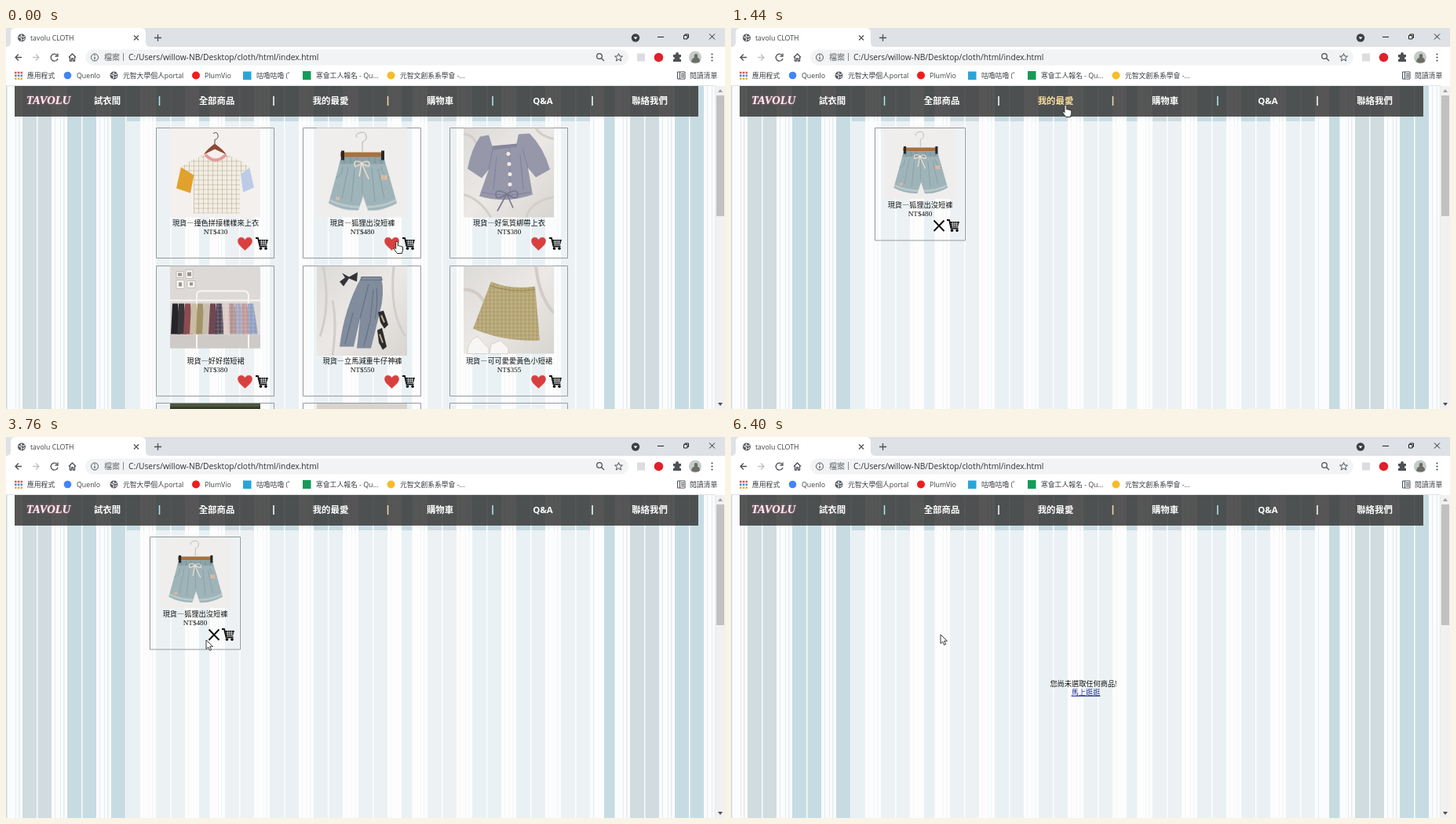
An HTML page that plays this animation: 916 by 486 pixels, repeating every 6.48 s.

```html
<!DOCTYPE html>
<html lang="zh-Hant">
<head>
<meta charset="utf-8">
<title>tavolu CLOTH</title>
<style>
html, body { margin: 0; width: 100%; height: 100%; overflow: hidden; background: #fff; }
svg { display: block; }
text { font-family: "Open Sans", "Noto Sans CJK TC", "Noto Sans CJK", sans-serif; fill: #3c4043; white-space: pre; }
.ui text { font-size: 8.8px; }
.ui .url { font-size: 10.25px; fill: #333; }
.line { fill: none; stroke: #4d5156; stroke-width: 1.3; }
.nav text { font-size: 11.4px; font-weight: 700; fill: #fff; text-anchor: middle; }
.nav .logo { font: italic 700 14.5px "Liberation Serif", serif; text-anchor: start; text-shadow: 0 0 2px #e8a; fill: #fdeef4; }
.item text { font-size: 9.2px; font-family: "Noto Sans CJK TC", "Noto Sans CJK", sans-serif; fill: #111; text-anchor: middle; }
.item .price { font-family: "Liberation Serif", serif; }
.box { fill: none; stroke: #959a9f; }
.empty text { font-size: 9.2px; fill: #111; text-anchor: middle; }
.empty .link { fill: #1c2f8c; text-decoration: underline; }

.shop, .faves, .saved, .empty, .hand, .arrow, .like, .all { animation: 6480ms step-end infinite; }
.shop { animation-name: shop; }
.faves { animation-name: faves; }
.saved { animation-name: saved; }
.empty { animation-name: empty; }
.hand { animation-name: hand; }
.arrow { animation-name: arrow; }
.nav .like { animation-name: like; }
.nav .all { animation-name: all; }
.zoom { transform-origin: 57.5px 57.5px; animation: zoom 6480ms infinite; }
.pointer { animation: move 6480ms linear infinite; }

@keyframes shop { 0% { opacity: 1 } 20.98%, 100% { opacity: 0 } }
@keyframes faves { 0% { opacity: 0 } 20.98%, 100% { opacity: 1 } }
@keyframes saved { 0% { opacity: 1 } 93.82%, 100% { opacity: 0 } }
@keyframes empty { 0% { opacity: 0 } 93.82%, 100% { opacity: 1 } }
@keyframes hand { 0% { opacity: 1 } 2.8% { opacity: 0 } 15.4% { opacity: 1 } 24% { opacity: 0 } 28.8% { opacity: 1 } 36.2%, 100% { opacity: 0 } }
@keyframes arrow { 0% { opacity: 0 } 2.8% { opacity: 1 } 15.4% { opacity: 0 } 24% { opacity: 1 } 28.8% { opacity: 0 } 36.2%, 100% { opacity: 1 } }
@keyframes like { 0% { fill: #fff } 15.4% { fill: #f8dc9c } 24%, 100% { fill: #fff } }
@keyframes all { 0% { fill: #fff } 28.8% { fill: #f8dc9c } 36.2%, 100% { fill: #fff } }
@keyframes zoom { 0%, 4.1% { transform: scale(1) } 8.5%, 13.3% { transform: scale(1.1) } 16.5%, 100% { transform: scale(1) } }
@keyframes move {
  0%, 1.2% { transform: translate(498px, 272px) }
  2.5% { transform: translate(497px, 269px) }
  8.64% { transform: translate(416px, 159px) }
  11.1% { transform: translate(416px, 150px) }
  16.05% { transform: translate(427px, 99px) }
  17.28%, 22.2% { transform: translate(427px, 98px) }
  29.6% { transform: translate(274px, 97px) }
  33.33%, 35.8% { transform: translate(272px, 96px) }
  45.68%, 67.9% { transform: translate(255px, 259px) }
  71.6%, 100% { transform: translate(267px, 252px) }
}
</style>
</head>
<body>
<svg width="916" height="486" viewBox="0 0 916 486">
<defs>
  <g id="pair">
    <path d="M0 0h18v500h-18zM19.5 0h17.5v500h-17.5z"/>
    <path d="M-9 0h1v500h-1zM-5 0h1.500v500h-1.500zM41 0h1v500h-1z" fill="#e3ecef"/>
  </g>
  <pattern id="stripes" x="-12" width="258" height="500" patternUnits="userSpaceOnUse" fill="#c7dce2">
    <path d="M0 0h258v500h-258z" fill="#fbfcfd"/>
    <path d="M0 0h13.500v500h-13.500z"/>
    <use href="#pair" x="33" fill="#d0dce0"/>
    <use href="#pair" x="90"/>
    <use href="#pair" x="146"/>
    <use href="#pair" x="203" fill="#cddee4"/>
  </pattern>
  <pattern id="grid" width="6" height="6" patternUnits="userSpaceOnUse"><path d="M0 .5H6M.5 0V6" stroke="#aaa492" stroke-width=".5"/></pattern>
  <pattern id="plaid" width="5" height="5" patternUnits="userSpaceOnUse"><path d="M0 1H5M1 0V5" stroke="#fff" stroke-opacity=".22"/></pattern>
  <linearGradient id="sheet" x2="1" y2="1"><stop stop-color="#dddbd8"/><stop offset=".5" stop-color="#ebe8e5"/><stop offset="1" stop-color="#d8d5d1"/></linearGradient>
  <clipPath id="frame"><path d="M0 0h115v114.500H0z"/></clipPath>

  <path id="heart" d="M0 8C-4 4-9 1-9-4C-9-9-2.500-10 0-5C2.500-10 9-9 9-4C9 1 4 4 0 8z" fill="#d8403f" stroke="#d8403f" stroke-width=".6"/>
  <g id="cart">
    <path d="M0 1h3l2.500 10.500h9" fill="none" stroke="#111" stroke-width="1.800"/>
    <path d="M3.500 3H16l-2 6.500H5z" fill="#111"/>
    <path d="M5 5.200h9.500M5.500 7.400h8.500M7.500 3.500v5.500M10 3.500v5.500M12.500 3.500v5.500" stroke="#eef3f5" stroke-width=".7"/>
    <circle cx="6.500" cy="14.300" r="1.700"/><circle cx="13" cy="14.300" r="1.700"/>
  </g>
  <g id="globe">
    <circle r="5" fill="#565a5f"/>
    <path d="M-4-1l3 1 1 2-1 2M0-4l-1 2 3 1 2-1M4 1l-2 1v1" fill="none" stroke="#fff" stroke-width="1.100"/>
  </g>

  <g id="tee">
    <path d="M0 0h115v114H0z" fill="#f4f0ed"/>
    <path d="M57 22V15q5-1 4-6t-6-2" fill="none" stroke="#555"/>
    <path d="M43 34q3-6 14-14 11 8 15 14l-15-7z" fill="#8d4a32"/>
    <path d="M14 50l18 2-6 31-18-6z" fill="#e0a22c"/>
    <path d="M89 52l12-2 6 26-14 6z" fill="#bccbe6"/>
    <path d="M44 34q13 10 28 0l20 9 9 8-12 9v49H30V60l-16-10 14-9z" fill="#f3eee2"/>
    <path d="M44 34q13 10 28 0l20 9 9 8-12 9v49H30V60l-16-10 14-9z" fill="url(#grid)"/>
    <path d="M45 34q13 14 26 0" fill="none" stroke="#e79a9c" stroke-width="4"/>
  </g>
  <g id="shorts">
    <path d="M0 0h115v114H0z" fill="#efeeec"/>
    <path d="M58 30V18q6-2 5-8t-8-4-4 6" fill="none" stroke="#aaa" stroke-width=".9"/>
    <path d="M30 31h55v6H30z" fill="#a8703f"/>
    <path d="M31 37h54l6 20 11 39q-20 11-37 9l-6-18-6 18q-20 1-38-9l11-40z" fill="#9fb4b9"/>
    <path d="M31 37h54l2 9H29z" fill="#8ba4aa"/>
    <path d="M16 92q18 9 38 9M64 101q20 0 37-9" fill="none" stroke="#bccbcd" stroke-width="3"/>
    <path d="M58 46v38M33 50q0 10-9 14M82 50q1 10 10 13M40 50l-8 40M48 52l-4 42M70 52l4 42M78 52l8 38" fill="none" stroke="#839da4"/>
    <path d="M35 38v7M43 38v7M51 38v7M66 38v7M74 38v7M82 38v7" stroke="#748f96"/>
    <path d="M57 44q-9-4-9 2t9-1q9-5 10 1t-10-1l-3 17m3-17l9 20" fill="none" stroke="#f0dfd0" stroke-width="1.500"/>
    <path d="M31 29h4v12h-4zM82 29h4v12h-4z" fill="#292929"/>
    <path d="M82 60h8v6h-8zM24 88h5v4h-5z" fill="#dbb9a0"/>
  </g>
  <g id="blouse">
    <path d="M0 0h115v114H0z" fill="url(#sheet)"/>
    <path d="M0 85q20 5 35 29M80 114q5-20 35-26M92 0q5 10 23 14M0 8q15 0 18 20" fill="none" stroke="#d3cec9" stroke-width="3"/>
    <path d="M21 11l11-2 5 16 30-3 3-14 14-1q18 18 26 46l-18 10-10-12 6 34q-34 12-68 2l12-34-9 11L5 52q5-26 16-41z" fill="#9797aa"/>
    <path d="M36 23l32-3v4l-31 4z" fill="#85859b"/>
    <path d="M23 82q32 7 62 0M59 25v60M32 53l5-25M82 51l-7-25M42 36l-4 42M72 34l4 44" fill="none" stroke="#80809a"/>
    <path d="M55 84q-14-8-14 1t14-1q14-8 14 1t-14-1l-12 22m12-22l8 18" fill="none" stroke="#77778f" stroke-width="1.600"/>
    <g fill="#f3ebe3"><circle cx="57" cy="33" r="2.500"/><circle cx="58" cy="46" r="2.500"/><circle cx="59" cy="59" r="2.500"/><circle cx="59" cy="72" r="2.500"/></g>
  </g>
  <g id="rack">
    <path d="M0 0h115v105H0z" fill="#ddd9d6"/>
    <path d="M0 88h115v17H0z" fill="#cecac7"/>
    <path d="M8 7h9v8H8zM20 5h9v11h-9zM8 18h10v11H8zM22 19h10v9H22z" fill="#f6f4f1" stroke="#aaa4a0" stroke-width=".6"/>
    <path d="M10 9h5v4h-5zM22 8h5v5h-5zM11 21h4v5h-4zM25 21h4v4h-4z" fill="#9a918f"/>
    <path d="M34 105V37q0-5 6-5h54q6 0 6 6v67M0 44h115" fill="none" stroke="#f8f6f4" stroke-width="2"/>
    <g id="skirts"></g>
  </g>
  <g id="jeans">
    <path d="M0 0h115v114.500H0z" fill="url(#sheet)"/>
    <path d="M8 0q10 50-4 90M98 0q-6 60 15 90M20 114q6-40 0-70" fill="none" stroke="#d0ceca" stroke-width="3"/>
    <path d="M57 14h25q5 22-2 46l-11 45H51l4-38-8 36H29q6-50 28-89z" fill="#818c9d"/>
    <path d="M57 14h25l1 4H56zM55 67l11-44M46 60l-10 40M72 30l-4 40-8 32M76 28q2 20-2 40" fill="none" stroke="#667185" stroke-width="1.200"/>
    <path d="M32 9l9 5 11-6-1 12-10-4-7 10-5-6 7-5z" fill="#33343a"/>
    <path d="M78 59l7-2 6 18-5 5-5-8zM77 82l6-3 6 24-5 4-5-9z" fill="#2c2c2e"/>
    <path d="M82 63l4 9M80 87l4 11" stroke="#c8aa8c" stroke-width="2"/>
  </g>
  <g id="skirt">
    <path d="M0 0h115v112H0z" fill="url(#sheet)"/>
    <path d="M92 0q4 40 23 60M0 30q20 0 28 20" fill="none" stroke="#d2ccc6" stroke-width="4"/>
    <path id="flare" d="M35 20q26 11 56 6l6 69q-46 2-85-15z" fill="#b1a06c"/>
    <path d="M35 20q26 11 56 6l6 69q-46 2-85-15z" fill="url(#plaid)"/>
    <path d="M33 25q28 10 58 5" fill="none" stroke="#948250"/>
    <path d="M5 106q4-14 13-16l8 9 6 6v7H5zM33 112l2-12 12-5 10 10v7z" fill="#f7f6f4" stroke="#cfcac5" stroke-width=".8"/>
  </g>
</defs>

<!-- page -->
<path d="M0 74h904v412H0z" fill="url(#stripes)"/>
<path d="M154 119h590v367H154z" fill="#fff" opacity=".62"/>
<g class="nav">
  <path d="M11 74h871v39H11z" fill="#303030" opacity=".81"/>
  <text class="logo" x="26" y="97">TAVOLU</text>
  <text x="129" y="96.500">試衣間</text>
  <text x="268.500" y="96.500" class="all">全部商品</text>
  <text x="413.500" y="96.500" class="like">我的最愛</text>
  <text x="553" y="96.500">購物車</text>
  <text x="684" y="96.500">Q&amp;A</text>
  <text x="820" y="96.500">聯絡我們</text>
  <g stroke-width="1.500"><path d="M195.500 87v12M620 87v12" stroke="#b4ecea"/><path d="M341 87v12M747 87v12" stroke="#fff"/><path d="M486.500 87v12" stroke="#f7d9ae"/></g>
</g>

<g class="shop" id="shop"></g>

<g class="faves">
  <g class="item saved">
    <path class="box" d="M183.500 127.500h115v143.500h-115z"/>
    <text x="241" y="229">現貨—狐狸出沒短褲</text>
    <text class="price" x="241" y="240">NT$480</text>
    <use href="#shorts" transform="translate(195.500 128) scale(.79)"/>
    <path d="M258.500 245.500l13 13.500m0-13.500l-13 13.500" stroke="#111" stroke-width="1.900"/>
    <use href="#cart" x="275" y="244"/>
  </g>
  <g class="empty">
    <text x="449" y="317.500">您尚未選取任何商品!</text>
    <text class="link" x="452" y="329">馬上逛逛</text>
  </g>
</g>

<!-- scrollbar -->
<path d="M904 74h12v412h-12z" fill="#f1f1f1"/>
<path d="M905 86h10v154h-10z" fill="#c1c1c1"/>
<path d="M907 82l3-4 3 4z" fill="#a0a0a0"/>
<path d="M907 478l3 4 3-4z" fill="#505050"/>

<!-- browser -->
<g class="ui">
  <path d="M0 0h916v74H0z" fill="#fff"/>
  <path d="M0 0h916v24H0z" fill="#dee1e6"/>
  <path d="M0 24q6 0 6-6V6q0-6 6-6h160q6 0 6 6v12q0 6 6 6z" fill="#fff"/>
  <path d="M0 73.500h904" stroke="#dfe3e6"/>
  <use href="#globe" x="20" y="12.500"/>
  <text x="31" y="16">tavolu CLOTH</text>
  <path class="line" d="M163 9.500l6 6m0-6l-6 6M189 12.500h9m-4.500-4.500v9"/>
  <circle cx="802" cy="12.500" r="5.200" fill="#3c4043"/><path d="M799.500 11.500h5l-2.500 3z" fill="#fff"/>
  <path class="line" style="stroke:#222;stroke-width:1" d="M830 11.500h8M863.500 9.500h4.500v4.500h-4.500zM865 9.500v-1.500h4.500v4.500h-1.500M896 7.500l7 7m0-7l-7 7"/>

  <path class="line" d="M20 37.500h-8m4-4l-4 4 4 4M65 34.500a4.500 4.500 0 1 0 1 4.500M66 32.500v3.500h-3.500M80 37.500l4.500-4.500 4.500 4.500M81.500 37v5h2v-3h2v3h2v-5"/>
  <path class="line" style="stroke:#bdc1c6" d="M34 37.500h8m-4-4l4 4-4 4"/>
  <rect x="101" y="27.500" width="692" height="20" rx="10" fill="#f1f3f4"/>
  <circle class="line" cx="113" cy="37.500" r="4.500" style="stroke-width:1"/><path class="line" d="M113 37v3M113 34.500v1.200"/>
  <text x="125" y="41" style="font-size:10px;fill:#5f6368">檔案</text><path d="M149.500 32v10" stroke="#888"/>
  <text class="url" x="156" y="41">C:/Users/willow-NB/Desktop/cloth/html/index.html</text>
  <circle class="line" cx="756" cy="36" r="3.300"/><path class="line" d="M758.500 38.500l3.500 3.500"/>
  <path class="line" style="stroke-width:1" d="M780.500 32.500l1.400 3.400 3.600.2-2.800 2.300 1 3.600-3.200-2-3.200 2 1-3.600-2.800-2.300 3.600-.2z"/>
  <rect x="804" y="32.500" width="10" height="10" fill="#dcdde0"/>
  <circle cx="831.500" cy="37.500" r="5.800" fill="#e0202b"/>
  <path d="M850 34h3q0-3 2-3t2 3h3v3q-2 0-2 1.500t2 1.500v3h-10v-3q2 0 2-1.500t-2-1.500z" fill="#4d5156"/>
  <circle cx="878" cy="37.500" r="8" fill="#c3ccc6"/><path d="M873 43q1-5 4-5-1-5 2-5t2 5q3 0 3 5-6 3-11 0z" fill="#6c6d66"/>
  <g fill="#4d5156"><circle cx="899.500" cy="33.500" r="1.100"/><circle cx="899.500" cy="37.500" r="1.100"/><circle cx="899.500" cy="41.500" r="1.100"/></g>

  <g stroke-width="2.600" stroke-dasharray="2.600 1.200">
    <path d="M11 57h10" stroke="#d9574b"/><path d="M11 60.800h10" stroke="#4a86e0"/><path d="M11 64.600h10" stroke="#e7b53b"/>
  </g>
  <circle cx="78.500" cy="60.500" r="4.800" fill="#4285f4"/>
  <use href="#globe" x="137.500" y="60.500"/>
  <circle cx="242" cy="60.500" r="5" fill="#f01c1c"/>
  <rect x="302" y="55.500" width="10.500" height="10.500" fill="#2aa4d8"/>
  <rect x="378" y="55" width="10.500" height="11" fill="#159b58"/>
  <circle cx="490.500" cy="60.500" r="5" fill="#f5bd2c"/>
  <text x="27" y="64">應用程式</text>
  <text x="90" y="64">Quenlo</text>
  <text x="149" y="64">元智大學個人portal</text>
  <text x="253" y="64">PlumVio</text>
  <text x="319" y="64">咕嚕咕嚕 (゜</text>
  <text x="395" y="64">寒會工人報名 - Qu...</text>
  <text x="502" y="64">元智文創系系學會 -...</text>
  <path class="line" style="stroke-width:1" d="M855.500 56h9.500v9h-9.500zM858.500 56v9M860 58.500h4M860 60.500h4M860 62.500h4"/>
  <text x="871" y="64">閱讀清單</text>
</g>

<g class="pointer" stroke="#222" fill="#fff" stroke-linejoin="round">
  <path class="arrow" d="M0 0v11.500l2.700-2.500 1.900 4.300 2-.9-1.900-4.200h3.700z" stroke-width=".9"/>
  <path class="hand" d="M-1.300 1q1.300-2 2.600 0v5q1.300-1 2.300.4 1.300-.9 2.200.5 1.700-.5 1.700 1.200v3l-1.200 4.400h-6l-4-5.500q-.6-1.800 1-1.700l1.400 1.500z"/>
</g>
</svg>
<script>
const $ = id => document.getElementById(id);

const tones = ["#24242a", "#39363a", "#8c4b50", "#c9bca2", "#a2936a", "#c9bdb0", "#6f4652", "#4f4254", "#d9cbc3", "#b18f90", "#a3a4bd", "#bf9598", "#8f9dc0"];
$("skirts").innerHTML = tones.map((c, i) => {
  const x = 3 + i * 8, d = `M${x} 48h7l${i > 7 ? 6 : 3} 39h-12z`;
  return `<path d="${d}" fill="${c}"/>` + (i > 6 ? `<path d="${d}" fill="url(#plaid)"/>` : "");
}).join("");

const goods = [
  ["tee", "撞色拼接樣樣來上衣", 430],
  ["shorts", "狐狸出沒短褲", 480],
  ["blouse", "好氣質綁帶上衣", 380],
  ["rack", "好好搭短裙", 380],
  ["jeans", "立馬減重牛仔神褲", 550],
  ["skirt", "可可愛愛黃色小短裙", 355],
];

const card = ([pic, name, price], i) => {
  const x = 192 + i % 3 * 187, y = 127 + Math.floor(i / 3) * 176;
  return `<g class="item" transform="translate(${x} ${y})">
    <path class="box" d="M-.5.5h150v166h-150z"/>
    <text x="75" y="125">現貨—${name}</text>
    <text class="price" x="75" y="135.500">NT$${price}</text>
    <use href="#heart" x="112.500" y="148.500"/><use href="#cart" x="126" y="140"/>
    <g transform="translate(17 .5)"><g class="${pic === "shorts" ? "zoom" : ""}"><use href="#${pic}" clip-path="url(#frame)"/></g></g>
  </g>`;
};

const nextRow = [0, 1, 2].map(i => `<path class="box" d="M${191.5 + i * 187} 490v-11.500h150v11.500"/>`).join("")
  + `<path d="M209 479h115v7H209z" fill="#4d5640"/><path d="M209 483h115v3H209z" fill="#343d2c"/>
     <path d="M396 479h115v7H396z" fill="#d8d4cd"/>`;

$("shop").innerHTML = goods.map(card).join("") + nextRow;
</script>
</body>
</html>
```
